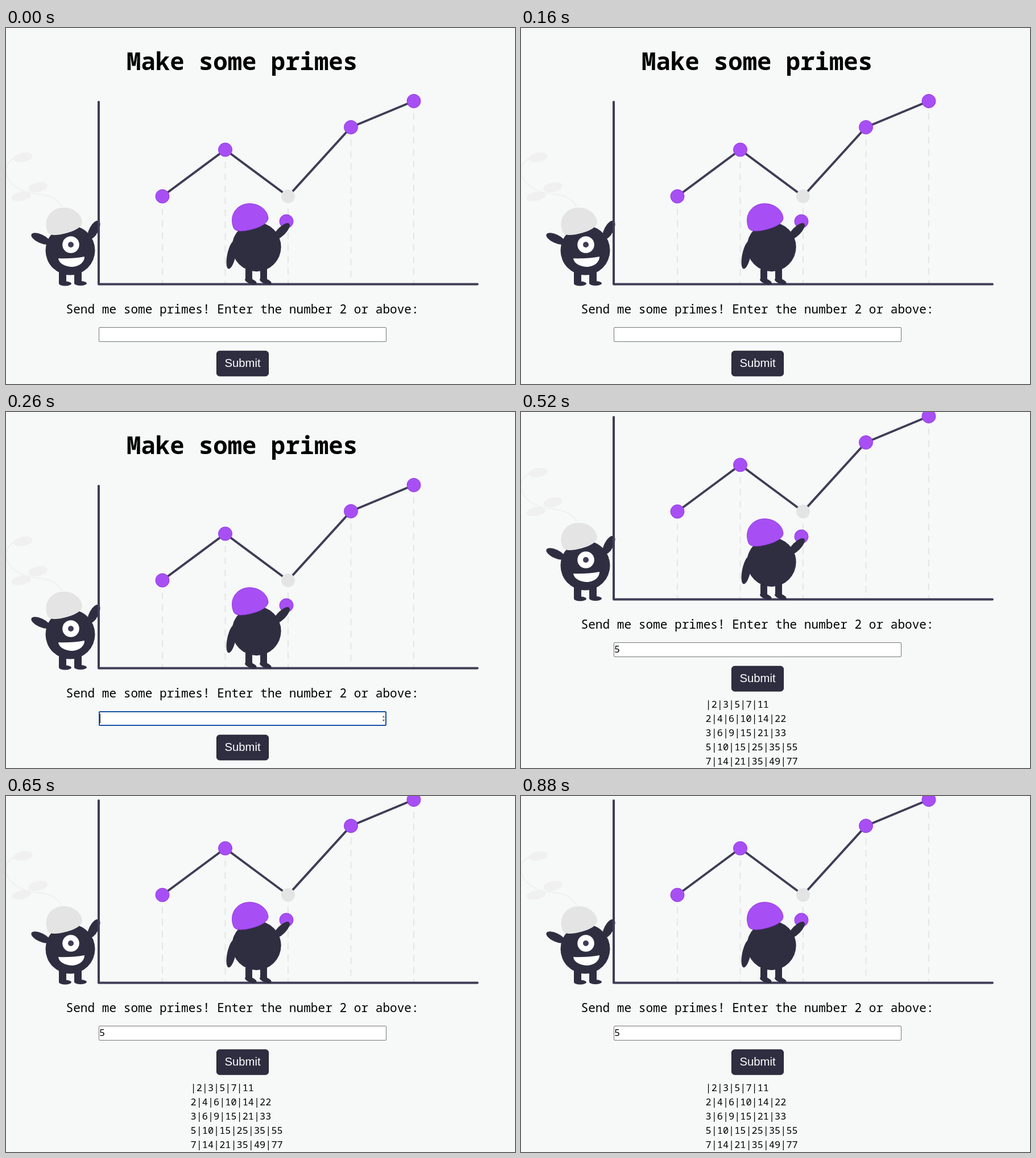
An HTML page that plays this animation: 895 by 626 pixels, repeating every 1040 ms.

```html
<!DOCTYPE html>
<html lang="en">
<head>
<meta charset="utf-8">
<title>Make some primes</title>
<style>
  html, body { margin: 0; width: 100%; height: 100%; overflow: hidden; background: #f7f8f8; }
  svg { display: block; }
  .mono { font-family: "Noto Sans Mono", "DejaVu Sans Mono", monospace; }
  .dark { fill: #2f2e41; }
  .dot { fill: #a74ff5; stroke: #9238e0; }
</style>
</head>
<body>
<svg width="895" height="626" viewBox="0 0 895 626">
  <defs>
    <path id="hat" d="M73 358 C66 339 75 322 92 317 C111 312 132 323 134 341 C134 350 121 357 105 361 C90 365 76 366 73 358Z"/>
  </defs>
  <g id="page">
    <text class="mono" x="212" y="74" font-size="42.3" font-weight="600">Make some primes</text>

    <g fill="#f0f0f0">
      <path d="M98 314 C78 282 49 300 20 281 C-6 266 -6 237 16 229" fill="none" stroke="#f0f0f0" stroke-width="2"/>
      <ellipse rx="17" ry="8" transform="translate(30 227.5) rotate(-10)"/>
      <ellipse rx="17" ry="8.5" transform="translate(56 280) rotate(-12)"/>
      <ellipse rx="17" ry="8" transform="translate(26.5 296) rotate(-12)"/>
    </g>

    <g id="drops" stroke="#e5e5e5" stroke-width="2" stroke-dasharray="12 9"></g>

    <!-- waving figure -->
    <g class="dark">
      <circle cx="113" cy="391" r="43.5"/>
      <path d="M93 425h13v24h-13zM120 425h13v24h-13z"/>
      <ellipse cx="104" cy="449.5" rx="11" ry="4"/>
      <ellipse cx="131" cy="449" rx="11" ry="4"/>
      <ellipse rx="18" ry="7.5" transform="translate(61 370.5) rotate(25)"/>
      <ellipse rx="18" ry="8" transform="translate(154.5 355) rotate(-62)"/>
    </g>
    <circle cx="114" cy="381" r="14.8" fill="#fff"/>
    <circle cx="114" cy="381" r="5" fill="#3f3d56"/>
    <path d="M92 405 Q116 406 138 402 C138 413 127 420 115 420 C103 419 93 414 92 405Z" fill="#fff"/>
    <use href="#hat" fill="#e4e4e4"/>

    <g fill="none" stroke="#3f3d56" stroke-width="4" stroke-linecap="round" stroke-linejoin="round">
      <path d="M163 130V450.5H829"/>
      <path id="graph"/>
    </g>
    <g id="dots"></g>

    <!-- figure lifting a dot -->
    <circle class="dot" cx="493" cy="340" r="12"/>
    <g class="dark">
      <circle cx="440.5" cy="385" r="43.2"/>
      <path d="M421 424h12v21h-12zM447 424h12v21h-12z"/>
      <ellipse rx="11" ry="4.5" transform="translate(430.5 445.5) rotate(20)"/>
      <ellipse rx="11" ry="4.5" transform="translate(456.5 445.5) rotate(20)"/>
      <ellipse rx="7.5" ry="25" transform="translate(396.5 399) rotate(12)"/>
      <ellipse rx="19" ry="7.5" transform="translate(484.5 357.5) rotate(-45)"/>
    </g>
    <use href="#hat" x="327" y="-7" class="dot"/>

    <text class="mono" x="105.5" y="502" font-size="21.1">Send me some primes! Enter the number 2 or above:</text>

    <rect x="163.5" y="526.5" width="505" height="25" rx="1.5" fill="#fff" stroke="#767676"/>
    <g id="focus">
      <rect x="164" y="527" width="504" height="24" rx="2" fill="none" stroke="#1653a6" stroke-width="2"/>
      <path d="M165.5 531v16" stroke="#222"/>
      <path d="M662 537l2-3 2 3zM662 541l2 3 2-3z" fill="#555"/>
    </g>

    <rect x="370.5" y="568" width="91" height="44" rx="5" fill="#2f2e41" stroke="#1c1b29"/>
    <text x="416" y="596" font-size="20.3" fill="#fff" text-anchor="middle" font-family="Liberation Sans, Arial, sans-serif">Submit</text>

    <g id="result" class="mono" font-size="16.9">
      <text x="164" y="543.5">5</text>
    </g>
  </g>
</svg>
<script>
const $ = id => document.getElementById(id);

function add(parent, tag, attrs, text = "") {
  const el = document.createElementNS("http://www.w3.org/2000/svg", tag);
  for (const key in attrs) el.setAttribute(key, attrs[key]);
  el.textContent = text;
  parent.append(el);
}

const points = [[275, 296], [385.5, 214], [496, 296], [606.5, 174.5], [717, 128.5]];
$("graph").setAttribute("d", "M" + points.join("L"));
points.forEach(([x, y], i) => {
  add($("drops"), "path", { d: `M${x} ${y + 21}V449` });
  add($("dots"), "circle", { cx: x, cy: y, r: 12, ...(i === 2 ? { fill: "#e4e4e4" } : { class: "dot" }) });
});

// multiplication table of the first five primes
const primes = [2, 3, 5, 7, 11];
["", 2, 3, 5, 7].forEach((n, row) => {
  const cells = [n, ...primes.map(p => p * (n || 1))];
  add($("result"), "text", { x: 324.5, y: 641 + row * 25 }, cells.join("|"));
});

const show = (id, on) => $(id).setAttribute("visibility", on ? "visible" : "hidden");

function draw(now) {
  const t = now % 1040;
  const scroll = t < 520 ? 0 : t < 650 ? 121 : 122;
  $("page").setAttribute("transform", `translate(0 ${-scroll})`);
  show("focus", t >= 260 && t < 520);
  show("result", t >= 520);
  requestAnimationFrame(draw);
}
draw(0);
</script>
</body>
</html>
```
